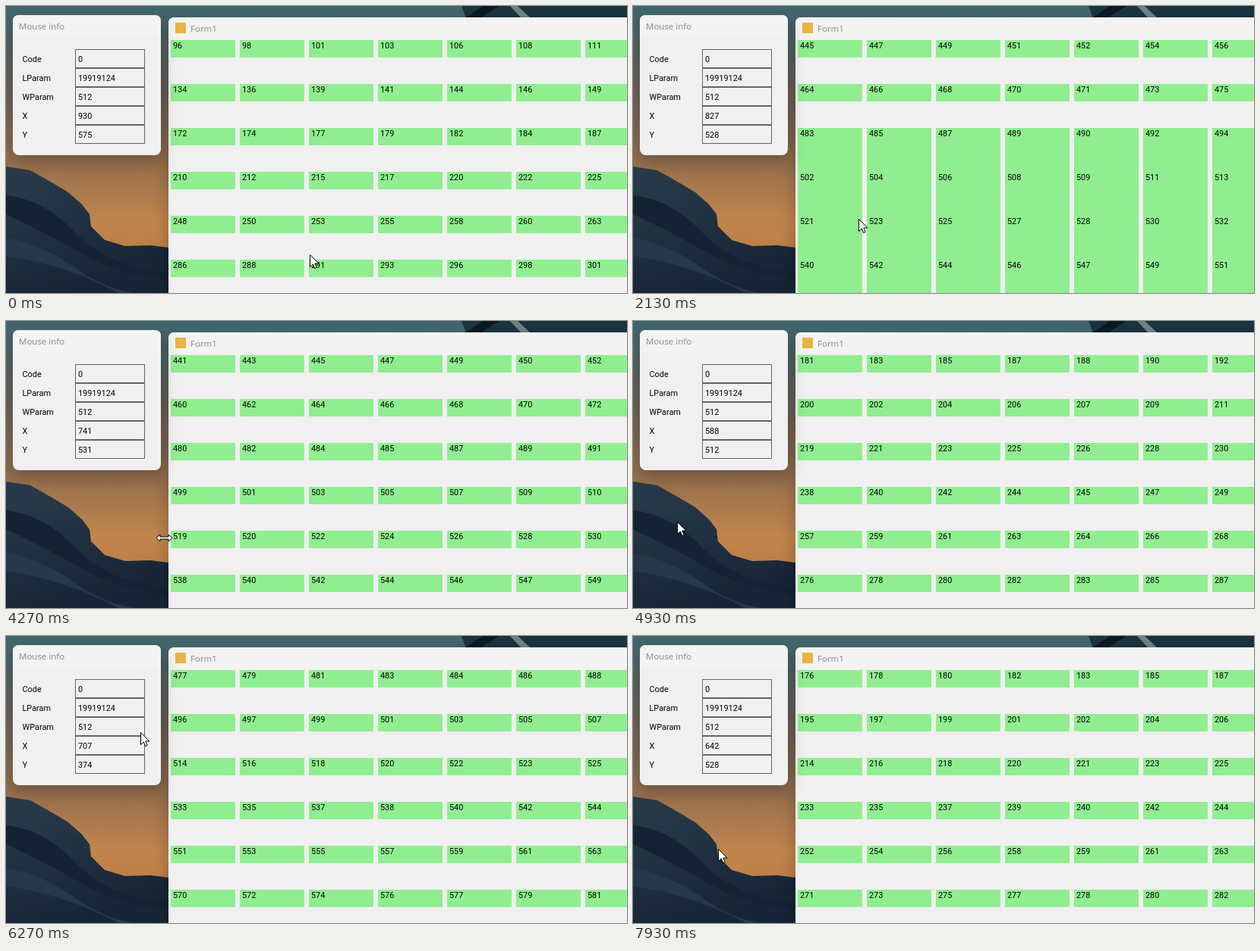
Recreate the animation shown at these times as an HTML page. Size 818 by 379 pixels, loop 8000 ms.

```html
<!DOCTYPE html>
<html lang="en">
<head>
<meta charset="utf-8">
<title>Mouse info</title>
<style>
  html, body { margin: 0; width: 100%; height: 100%; overflow: hidden; background: #f0f0f0; }
  svg { display: block; width: 818px; height: 379px; }
  text { font: 10.9px Roboto, "Open Sans", sans-serif; fill: #000; }
  .title { font: 11.5px "Open Sans", "Noto Sans", sans-serif; fill: #868686; }
  .box { fill: #f0f0f0; stroke: #646464; }
  .cell { fill: #90ee90; }
  .window { filter: drop-shadow(0 8px 11px rgba(0, 0, 0, .25)); }
</style>
</head>
<body>
<svg viewBox="0 0 818 379">
  <defs>
    <linearGradient id="sky" x2="0" y2="1">
      <stop offset="0" stop-color="#3f6870"/>
      <stop offset=".3" stop-color="#6d6259"/>
      <stop offset=".55" stop-color="#97704d"/>
      <stop offset=".75" stop-color="#c1854c"/>
      <stop offset="1" stop-color="#b87740"/>
    </linearGradient>
    <linearGradient id="rock" x2=".4" y2="1">
      <stop offset="0" stop-color="#2a3c4c"/>
      <stop offset="1" stop-color="#172536"/>
    </linearGradient>
  </defs>

  <rect width="818" height="379" fill="url(#sky)"/>
  <path d="M600 0H818V16H606Z" fill="#1a3440"/>
  <path d="M628 0H650L626 15H606Z" fill="#0d1a22"/>
  <path d="M664 0H674L690 15H678Z" fill="#6f8485"/>
  <path d="M0 212L32 217 62 234 82 246 100 262 110 275 112 291 130 309 157 317 190 316 214 319V379H0Z" fill="url(#rock)"/>
  <path d="M0 250Q50 255 92 300T214 352V361Q150 356 100 327T0 275Z" fill="#142233"/>
  <path d="M0 306Q50 316 90 345T170 379H148Q80 342 0 330Z" fill="#25374a"/>

  <g class="window">
    <path d="M214 379V23Q214 15 222 15H818V379Z" fill="#f0f0f0"/>
    <path d="M214 44V23Q214 15 222 15H818V44Z" fill="#f3f3f3"/>
  </g>
  <rect x="223" y="22" width="14" height="14" fill="#e9b440"/>
  <text class="title" x="243" y="34">Form1</text>
  <g id="grid"></g>

  <g class="window">
    <rect x="9" y="12" width="195" height="185" rx="8" fill="#f0f0f0"/>
    <path d="M9 42V20Q9 12 17 12H196Q204 12 204 20V42Z" fill="#f3f3f3"/>
  </g>
  <text class="title" x="17" y="31">Mouse info</text>
  <g id="info"></g>

  <path id="arrow" d="M.5 .5V16.5L4.3 13 6.8 18.6 9.2 17.5 6.8 12H12Z" fill="#fff" stroke="#000"/>
  <path id="resize" d="M-10.5 0L-5.5 -4.5V-1.5H5.5V-4.5L10.5 0 5.5 4.5V1.5H-5.5V4.5Z" fill="#fff" stroke="#000"/>
</svg>

<script>
const LOOP = 8000, TICK = 200 / 3, ROWS = 6, COLS = 7;

// Pointer path: time, x, y
const path = [
  [0, 401, 328], [1270, 76, 268], [2250, 330, 282], [3070, 505, 253], [4270, 212, 284],
  [4930, 59, 265], [5700, 225, 160], [6270, 178, 127], [7400, 51, 262], [7870, 113, 281],
  [LOOP, 113, 281]
];

// Loop time to wall clock, both in ms
const clock = [[0, 440], [1270, 1681], [3070, 3541.5], [LOOP, 8440]];

// Refresh passes: start on the wall clock, ms per row
const anchors = [
  [96, 38], [1310, 25.2], [1667, 19], [3223, 18.6], [3463, 19.5],
  [4441, 19.4], [5181, 19], [6477, 18.6], [8176, 19]
];

const lerp = (a, b, k) => a + (b - a) * k;

function makePass(start, rowTime) {
  const colTime = 1.3 + .03 * rowTime;
  const at = (r, c) => start + rowTime * r + colTime * c;
  return { at, end: at(ROWS - 1, COLS - 1) };
}

// Regular passes fill the time between the anchors; the newest comes first
const passes = anchors.flatMap(([start, rowTime], i) => {
  const gap = (anchors[i + 1] || [start])[0] - start;
  const count = Math.max(1, Math.round(gap / 350));
  return Array.from({ length: count }, (_, k) =>
    makePass(Math.round(start + gap * k / count), k ? 19 : rowTime));
}).reverse();

function segment(keys, t) {
  let i = 0;
  while (i < keys.length - 2 && t >= keys[i + 1][0]) i++;
  return i;
}

function wallClock(t) {
  const i = segment(clock, t), [t0, a] = clock[i], [t1, b] = clock[i + 1];
  return lerp(a, b, (t - t0) / (t1 - t0));
}

// Monotone cubic through the path points
function pointer(t, axis) {
  const i = segment(path, t);
  const rate = j => path[j + 1] && path[j]
    ? (path[j + 1][axis] - path[j][axis]) / (path[j + 1][0] - path[j][0]) : 0;
  const slope = j => {
    const a = rate(j - 1), b = rate(j);
    return a * b > 0 ? 2 * a * b / (a + b) : 0;
  };
  const p = path[i], q = path[i + 1], h = q[0] - p[0], u = (t - p[0]) / h;
  const s = u * u * (3 - 2 * u);
  return Math.round(lerp(p[axis], q[axis], s)
    + h * u * (1 - u) * ((1 - u) * slope(i) - u * slope(i + 1)));
}

function add(parent, tag, attrs, label = "") {
  const el = document.createElementNS("http://www.w3.org/2000/svg", tag);
  for (const name in attrs) el.setAttribute(name, attrs[name]);
  el.textContent = label;
  return parent.appendChild(el);
}

const byId = id => document.getElementById(id);
const grid = byId("grid"), info = byId("info"), arrow = byId("arrow"), resize = byId("resize");

const fields = ["Code", "LParam", "WParam", "X", "Y"].map((name, i) => {
  const y = 57 + 25 * i;
  add(info, "text", { x: 21.5, y: y + 17 }, name);
  add(info, "rect", { class: "box", x: 91.5, y: y + .5, width: 91, height: 24 });
  return add(info, "text", { x: 95, y: y + 17 }, ["0", "19919124", "512"][i]);
});

const cells = [];
for (let r = 0; r < ROWS; r++) {
  for (let c = 0; c < COLS; c++) {
    const x = 217 + 91 * c, y = 45 + 58 * r;
    cells.push({
      r, c,
      back: add(grid, "rect", { class: "cell", x, y, width: 85, height: 23 }),
      label: add(grid, "text", { x: x + 3, y: y + 11 })
    });
  }
}

function draw(t) {
  const now = wallClock(t);
  for (const { r, c, back, label } of cells) {
    const pass = passes.find(p => p.at(r, c) <= now);
    const tall = now < pass.end + 8 * (r + 1);   // gaps are wiped row by row after a pass
    back.setAttribute("height", tall ? 58 : 23);
    label.textContent = Math.round(pass.at(r, c)) % 1000;
  }

  const x = pointer(t, 1), y = pointer(t, 2);
  fields[3].textContent = x + 529;
  fields[4].textContent = y + 247;
  const onEdge = Math.abs(x - 211) < 5;
  arrow.style.display = onEdge ? "none" : "";
  resize.style.display = onEdge ? "" : "none";
  arrow.setAttribute("transform", `translate(${x - 1} ${y})`);
  resize.setAttribute("transform", `translate(${x - 3.5} ${y + 2.5})`);
}

// Screen updates fall on whole hundredths of a second
const stamp = k => Math.round(k * TICK / 10) * 10;
const began = performance.now();
let shown = -1;

function frame() {
  const t = (performance.now() - began) % LOOP;
  let k = Math.floor(t / TICK + .06);
  if (stamp(k) > t) k--;
  if (k !== shown) draw(stamp(shown = k));
  requestAnimationFrame(frame);
}

frame();
</script>
</body>
</html>
```
